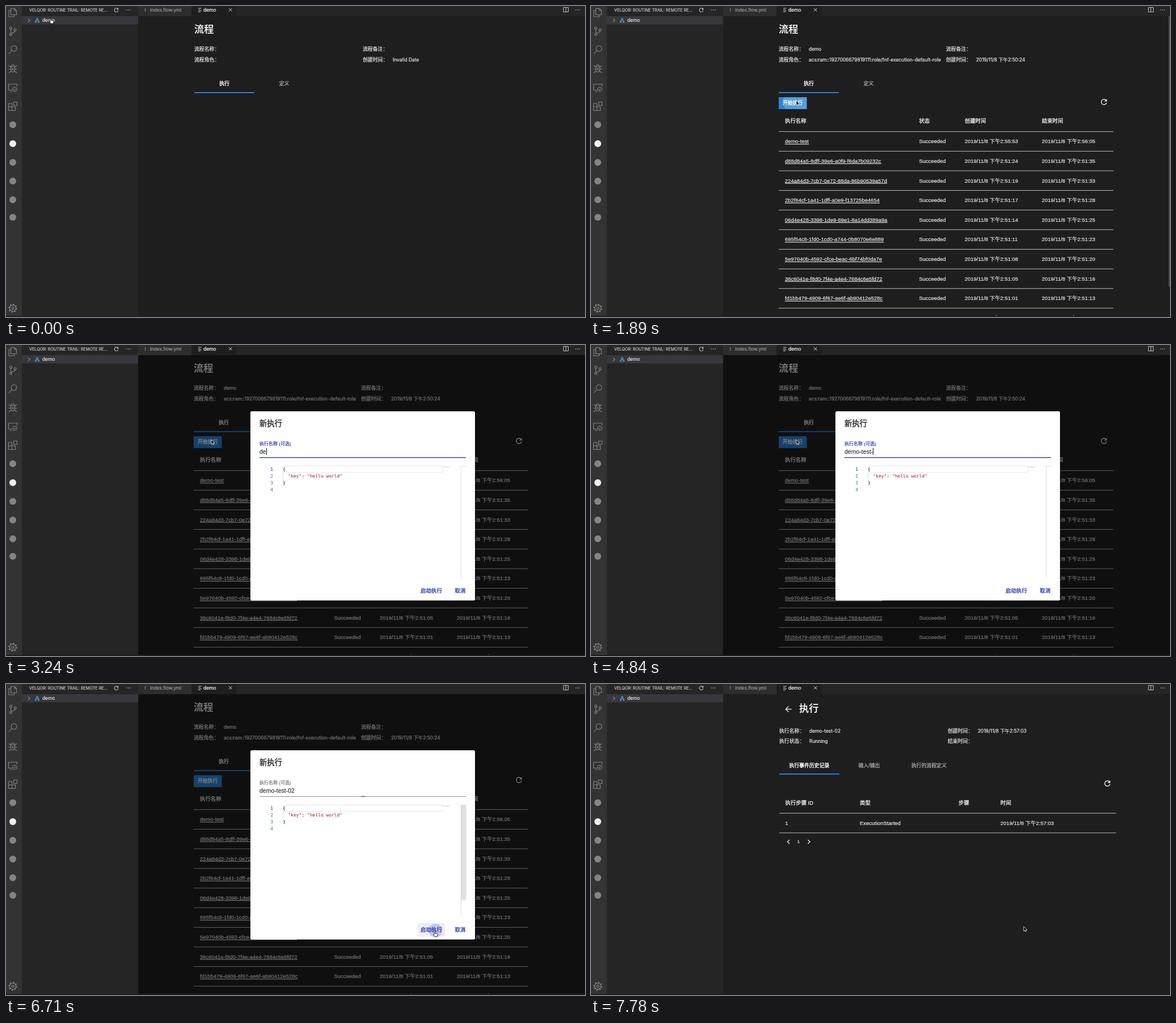
Recreate the animation shown at these times as an HTML page. Size 1021x549 px, loop 8 s.

```html
<!DOCTYPE html>
<html lang="zh-CN">
<head>
<meta charset="utf-8">
<style>
html, body { margin: 0; width: 100%; height: 100%; overflow: hidden; background: #1e1e1e }
svg { display: block }
text { font-family: "Liberation Sans", "Noto Sans CJK SC", "Noto Sans CJK", sans-serif; white-space: pre; stroke-width: .22 }
.ui { font-family: Inter, "Noto Sans CJK SC", "Noto Sans CJK", sans-serif }
.cell { letter-spacing: .1px }
.mono { font-family: "DejaVu Sans Mono", monospace; stroke-width: 0 }
.mid { text-anchor: middle }
.end { text-anchor: end }
.link { text-decoration: underline }
.bold { font-weight: 700; stroke-width: 0 }
.med { font-weight: 500; stroke-width: .35 }
</style>
</head>
<body>
<svg id="stage" width="1021" height="549" viewBox="0 0 1021 549"></svg>
<script>
const LIGHT = '#e8e8e8', BLUE = '#2b8ae6', INDIGO = '#2b3db4', ICON = '#858585', RULE = '#bdbdbd';

// y is the vertical middle of the text; the thin stroke gives it a fuller weight
const text = (x, y, s, size, fill = LIGHT, cls = '') =>
  `<text x="${x}" y="${(y + size * .36).toFixed(2)}" font-size="${size}" fill="${fill}" stroke="${fill}" class="${cls}">${s}</text>`;
const rect = (x, y, w, h, fill, more = '') =>
  `<rect x="${x}" y="${y}" width="${w}" height="${h}" fill="${fill}" ${more}/>`;
const line = (d, color = ICON, w = 1.1, more = '') =>
  `<path d="${d}" fill="none" stroke="${color}" stroke-width="${w}" ${more}/>`;
const dot = (x, y, r, fill, more = '') => `<circle cx="${x}" cy="${y}" r="${r}" fill="${fill}" ${more}/>`;
const ring = (x, y, r, color = ICON, w = 1.1, more = '') =>
  dot(x, y, r, 'none', `stroke="${color}" stroke-width="${w}" ${more}`);
const group = (id, body) => `<g id="${id}">${body}</g>`;
const dots = (x, y) => [-3.2, 0, 3.2].map(d => dot(x + d, y, .8, '#c5c5c5')).join('');
const reload = (x, y, r, color, w) =>
  line(`M${x + r * .7} ${y - r * .7}A${r} ${r} 0 1 0 ${x + r} ${y + r * .25}`, color, w) +
  `<path d="M${x + r * 1.1} ${y - r * 1.15}v${r}h${-r}z" fill="${color}"/>`;

function chrome() {
  const activity =
    line('M8.5 4.5h6.5l3.5 3.5v7.5h-10zM15 4.5v3.5h3.5M8.5 8h-3.5v11h9.5v-3.5') +
    ring(8.5, 39, 2) + ring(8.5, 50, 2) + ring(16, 42, 2) + line('M8.5 41v7M16 44c0 3-4 3-7.3 4.3') +
    ring(14, 75, 5) + line('M10.3 78.8L5 84.5') +
    line('M8.5 107h7v5a3.5 4.5 0 0 1-7 0zM9 107a3 3 0 0 1 6 0M5 105l3.5 3M19 105l-3.5 3M4.5 111.5h4M15.5 111.5h4M5 118l4-3M19 118l-4-3M10.3 109.5l3.4 4M13.7 109.5l-3.4 4') +
    line('M10.5 148.5H4.5V138h15v4M7 151h4') + ring(15.5, 147, 3.8) + line('M13.7 147l1.3 1.3 2.3-2.5') +
    line('M4.5 172h6v6h6v6.5h-12zM4.5 178h6v6.5M13.5 169.5h6v6h-6z') +
    [209.5, 243, 276, 309, 342, 373].map(y => dot(12, y, 6, y === 243 ? '#f0f0f0' : ICON)).join('') +
    ring(12, 533.5, 5.4) + ring(12, 533.5, 6.8, ICON, 2, 'stroke-dasharray="2.4 2.94"') + ring(12, 533.5, 2);
  return rect(0, 0, 1021, 549, '#1e1e1e') + rect(0, 0, 28, 549, '#333') + rect(28, 0, 205, 549, '#252526') +
    rect(233, 0, 788, 18, '#252526') + rect(233, 0, 94, 18, '#2d2d2d') + rect(327, 0, 79, 18, '#1e1e1e') +
    rect(28, 18, 205, 14.5, '#37373d') + activity +
    text(41, 7, 'VELQOR: ROUTINE TRAIL: REMOTE RE...', 7.2, '#c4c4c4', 'ui') +
    reload(194.5, 7, 3.4, '#c5c5c5', 1.1) + dots(216, 7) +
    line('M39 22.5l3 3-3 3', '#c5c5c5', 1) +
    line('M53.8 22h2.4v2h-2.4zM51.5 27h2v2h-2zM56.5 27h2v2h-2zM55 24v1.5M52.5 27v-1.5h5v1.5', '#5f9fd0', 1) +
    text(64, 25.5, 'demo', 8.3, '#e4e4e4', 'ui') +
    text(244, 7, '!', 9.5, '#a074c4', 'bold') + text(254, 7, 'index.flow.yml', 8.2, '#9a9a9a', 'ui') +
    line('M339 4h6M339 6.2h4M339 8.4h6M339 10.5h4', '#c5c5c5', .9) +
    text(348, 7, 'demo', 8.5, '#fff', 'ui') + line('M393 4l5.5 5.5M398.5 4l-5.5 5.5', '#ddd', 1) +
    line('M983 2.5h8.5v8h-8.5zM987.2 2.5v8', '#c5c5c5', 1) + dots(1008, 7);
}

const tab = (x, y, s, on) => text(x, y, s, 8.9, on ? '#fff' : '#b4b4b4', on ? 'mid med' : 'mid');

// pairs of label and value in two columns
const info = (x, x2, ys, items) => items.map(([label, value], i) => {
  const left = i % 2 ? x2 : x, y = ys[i >> 1];
  return text(left, y, label + '：', 8.9) + text(left + 53, y, value, 8.4, LIGHT, 'ui');
}).join('');

const home = (x, x2, name, role, date) =>
  text(x, 41, '流程', 17.2, LIGHT, 'bold') +
  info(x, x2, [76, 94.5], [['流程名称', name], ['流程备注', ''], ['流程角色', role], ['创建时间', date]]) +
  tab(x + 53, 137, '执行', true) + tab(x + 158.5, 137, '定义') + rect(x, 152, 106, 1.8, BLUE);

const day = s => '2019/11/8 下午2:' + s;
const runs = [
  ['demo-test', '55:53', '56:05'],
  ['d88d84a5-8dff-39e6-a0f9-f6da7b09232c', '51:24', '51:35'],
  ['224a84d3-7cb7-0e72-88da-86b90539a57d', '51:19', '51:33'],
  ['2b2f64cf-1a41-1dff-a0e9-f13725be4654', '51:17', '51:28'],
  ['06d4e428-3398-1de9-89e1-8a14dd389a9a', '51:14', '51:25'],
  ['695f54c8-1fd0-1cd0-a744-0b8070e6e889', '51:11', '51:23'],
  ['5e97040b-4592-cfce-beac-6bf74bf0da7e', '51:08', '51:20'],
  ['36c6041e-f8d0-7f4e-a4e4-7684c6e5fd72', '51:05', '51:16'],
  ['fd1bb479-4909-6f67-ae6f-ab90412e528c', '51:01', '51:13'],
  ['480904ca-bbac-ffc2-a07c-10022617fc20', '50:58', '51:10']
];

function list() {
  const head = [[342, '执行名称'], [578.5, '状态'], [659, '创建时间'], [795, '结束时间']];
  const rows = runs.map(([name, from, to], i) => {
    const y = 239 + i * 34.63, cell = (x, s, c = '') => text(x, y, s, 9.25, LIGHT, 'cell ' + c);
    return rect(331, y - 17.8, 590, 1, RULE) + cell(342, name, 'link') +
      cell(578.5, 'Succeeded') + cell(659, day(from)) + cell(795, day(to));
  }).join('');
  return home(331, 626, 'demo', 'acs:ram::1927006679819111:role/fnf-execution-default-role', day('50:24')) +
    '<clipPath id="button"><rect x="331" y="161" width="49.5" height="21"/></clipPath>' +
    rect(331, 161, 49.5, 21, '#2a85da') +
    dot(362, 168, 23.3, '#fff', 'id="ripple" fill-opacity=".2" clip-path="url(#button)"') +
    text(338, 171, '开始执行', 8.9, '#fff', 'med') + reload(904.5, 169.3, 4.7, LIGHT, 1.4) +
    head.map(([x, s]) => text(x, 203, s, 9.4, LIGHT, 'med')).join('') + rows;
}

function dialog() {
  const code = (x, y, s, fill, cls = '') => text(x, y, s, 7.95, fill, 'mono ' + cls);
  const numbers = [1, 2, 3, 4].map(n =>
    code(471, 206.7 + n * 12, n, n === 1 ? '#0b216f' : '#237893', 'end')).join('');
  return rect(233, 18, 788, 531, '#000', 'opacity=".5"') + rect(431, 117, 396, 334, '#fff', 'rx="2.5"') +
    text(447, 138, '新执行', 13.3, '#222', 'med') +
    group('focus', text(447, 174.3, '执行名称 (可选)', 8, INDIGO) + rect(447, 198, 364, 1.4, INDIGO)) +
    group('blur', text(447, 174.3, '执行名称 (可选)', 8, '#757575') + rect(447, 198, 364, 1, '#8f8f8f') +
      rect(626.5, 197.8, 6, 1.4, INDIGO)) +
    '<text id="typed" x="447" y="192" font-size="10.5" fill="#111"></text>' +
    rect(447, 182, 1, 12, '#111', 'id="caret"') +
    line('M488.5 213.5H770v11.5H488.5z', '#e6e6e6', 1) + line('M488.5 225v12', '#d6d6d6', .8) +
    numbers + code(488, 218.7, '{', '#111') + code(497.5, 230.7, '"key"', '#a31515') +
    code(521.4, 230.7, ':', '#111') + code(531, 230.7, '"hello world"', '#a31515') + code(488, 242.7, '}', '#111') +
    line('M771 214.5h1.5M772 215.5h2M775 215.5h7', '#b5b5b5', .8) + line('M811 213.5h-8.5V411', '#e0e0e0', 1) +
    rect(802, 214, 9.5, 167, '#c1c1c1', 'id="bar"') +
    rect(726, 422, 48.5, 24, '#eceef7', 'id="hover" rx="2.5"') + dot(757.5, 435, 12, '#c3c8e6', 'id="press"') +
    text(731, 434, '启动执行', 9.5, INDIGO, 'med') + text(791.5, 434, '取消', 9.4, INDIGO, 'med');
}

function run() {
  const head = [[342.5, '执行步骤 ID'], [474, '类型'], [648, '步骤'], [722, '时间']];
  const row = [[342.5, '1'], [474, 'ExecutionStarted'], [722, day('57:03')]];
  return line('M353.5 44.5h-10M348.3 39.5l-5 5 5 5', LIGHT, 1.3) + text(367, 43, '执行', 17.2, LIGHT, 'bold') +
    info(332, 629, [83, 100.5],
      [['执行名称', 'demo-test-02'], ['创建时间', day('57:03')], ['执行状态', 'Running'], ['结束时间', '']]) +
    tab(385, 143.5, '执行事件历史记录', true) + tab(490.5, 143.5, '输入/输出') + tab(596, 143.5, '执行的流程定义') +
    rect(332, 158, 106, 1.8, BLUE) + reload(910.5, 175.5, 4.7, LIGHT, 1.4) +
    head.map(([x, s]) => text(x, 210, s, 9.4, LIGHT, 'med')).join('') +
    row.map(([x, s]) => text(x, 245.5, s, 9.25, LIGHT, 'cell')).join('') +
    rect(332, 227.6, 594, 1, RULE) + rect(332, 262.3, 594, 1, RULE) +
    line('M350 275l-3.5 3.5 3.5 3.5M382.5 275l3.5 3.5-3.5 3.5', LIGHT, 1.4) +
    text(366, 278.3, '1', 7.8, LIGHT, 'mid');
}

const pointers =
  '<path id="arrow" d="M0 0V8.3L1.9 6.6 3.2 9.3 4.6 8.7 3.4 6.1H6Z" fill="#000" stroke="#fff" stroke-width=".8"/>' +
  '<path id="hand" d="M-2-3.6q.9-1.1 1.7.1v2.3l3.1.8q1 .4.7 1.6l-.7 3.3h-4.1l-2.5-3.4q.1-1.2 1.5-.4z" fill="#fff" stroke="#000" stroke-width=".8"/>' +
  '<path id="beam" d="M-2-5q2 0 2 1.2 0-1.2 2-1.2M0-4v8M-2 5q2 0 2-1.2 0 1.2 2 1.2" fill="none" stroke="#222" stroke-width=".9"/>';

stage.innerHTML = chrome() + group('empty', home(332, 629, '', '', 'Invalid Date')) + group('list', list()) +
  rect(1018.6, 18, 2.4, 478, '#4f4f4f', 'id="scroll"') + group('dialog', dialog()) + group('run', run()) +
  rect(0, 547, 1021, 2, '#241a22') + group('cursor', pointers);

const $ = id => document.getElementById(id);
const show = (id, on) => $(id).style.display = on ? '' : 'none';
// last step that has begun, each step being [start, ...values]
const at = (steps, t) => steps.filter(s => s[0] <= t).pop();

const typing = [[0, 0], [3240, 2], [3510, 4], [3770, 5], [4040, 7], [4310, 9], [4840, 10], [5110, 12]];
const caretOn = [[0, 1], [2430, 0], [2970, 1], [5650, 0], [6180, 1], [6710, 0]];
const barFade = [[0, 1], [2700, .5], [2970, 0], [6180, 1], [6710, .5]];
const moves = [
  [0, 'hand', 80.5, 26.5], [540, 'arrow', 140, 44.5], [810, 'arrow', 361, 146], [1080, 'arrow', 361, 166],
  [1350, 'arrow', 362, 167], [5650, 'beam', 540, 228], [5910, 'beam', 633, 263], [6180, 'arrow', 720, 395],
  [6440, 'hand', 757.5, 441.5], [6970, 'arrow', 756, 436.5], [7510, 'arrow', 763, 427], [7780, 'arrow', 763, 428]
];

function draw(t) {
  show('empty', t < 270);
  show('list', t >= 270 && t < 6970);
  show('scroll', t >= 270 && t < 2160);
  show('ripple', t >= 1890 && t < 2160);
  show('dialog', t >= 2160 && t < 6970);
  show('run', t >= 6970);
  show('focus', t < 6710);
  show('blur', t >= 6710);
  show('hover', t >= 6440);
  show('press', t >= 6710);
  $('typed').textContent = 'demo-test-02'.slice(0, at(typing, t)[1]);
  show('caret', at(caretOn, t)[1]);
  if (t >= 2160 && t < 6970) $('caret').setAttribute('x', Math.round(447 + $('typed').getComputedTextLength()));
  $('bar').setAttribute('opacity', at(barFade, t)[1]);
  const [, kind, x, y] = at(moves, t);
  for (const id of ['arrow', 'hand', 'beam']) show(id, id === kind);
  $('cursor').setAttribute('transform', `translate(${x} ${y})`);
}

const start = performance.now();
function frame() {
  draw((performance.now() - start) % 8000);
  requestAnimationFrame(frame);
}
frame();
</script>
</body>
</html>
```
